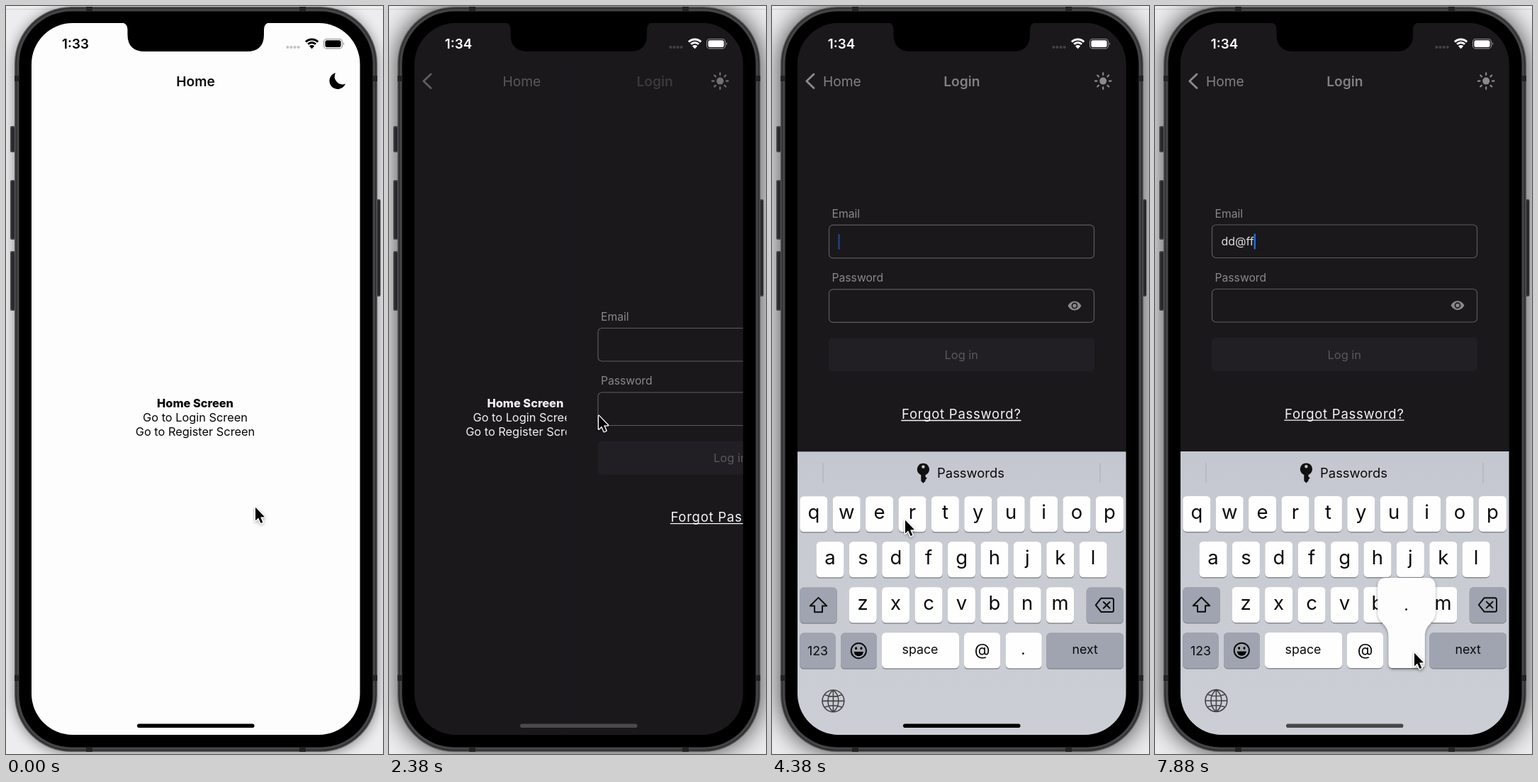
These frames come from a looping animation (532x1053 px, 8 s). An HTML page:

```html
<!DOCTYPE html>
<html lang="en">
<head>
<meta charset="utf-8">
<title>Login demo</title>
<style>
html, body { margin: 0; width: 100%; height: 100%; overflow: hidden; background: #ededef; }
svg { display: block; width: 100vw; height: 100vh; font-family: Inter, "Liberation Sans", sans-serif;
  --bg: #fefdfe; --ink: #060606; --title: #0b0b0c; --dots: #c3c2c5; --status: #000; --rim: #8f8e91; }
svg.dark { --bg: #1a181b; --ink: #f1f0f2; --title: #818083; --dots: #424145; --status: #fff; --rim: #8f8e91; }
.bg { fill: var(--bg); }
.ink { fill: var(--ink); }
.title { fill: var(--title); font-weight: 600; font-size: 19.2px; }
.mid { text-anchor: middle; }
.body { font-size: 16.35px; }
.label { font-size: 15.7px; fill: #89888b; }
.field { fill: none; stroke: #5b5a5d; stroke-width: 1.2; }
.letter { font-size: 27.5px; fill: #0a0a0b; text-anchor: middle; }
.small { font-size: 17.8px; fill: #0a0a0b; text-anchor: middle; }
.line { fill: none; stroke: #0c0c0d; stroke-width: 2; stroke-linejoin: round; stroke-linecap: round; }
</style>
</head>
<body>
<svg id="stage" viewBox="0 0 532 1053" preserveAspectRatio="none">
  <defs>
    <clipPath id="screen"><rect x="36" y="24" width="463.5" height="1002" rx="58"/></clipPath>
    <filter id="soft" x="-20%" y="-20%" width="140%" height="140%"><feGaussianBlur stdDeviation="9"/></filter>
    <filter id="deep" x="-20%" y="-20%" width="140%" height="140%"><feGaussianBlur stdDeviation="18"/></filter>
    <filter id="lift" x="-30%" y="-30%" width="160%" height="160%">
      <feDropShadow dx="0" dy="1.5" stdDeviation="2" flood-opacity=".35"/>
    </filter>
    <linearGradient id="board" x2="0" y2="1">
      <stop stop-color="#c4c7cf"/><stop offset=".3" stop-color="#c8cbd2"/><stop offset="1" stop-color="#cbced5"/>
    </linearGradient>
  </defs>

  <rect width="532" height="1053" fill="#ededef"/>
  <path d="M0 4.5H532" stroke="#cfcfd1"/>
  <rect id="calm" x="12" y="3" width="512" height="1049" rx="80" filter="url(#soft)"/>
  <rect id="active" x="12" y="1" width="512" height="1049" rx="80" filter="url(#deep)"/>

  <g id="phone"></g>

  <g clip-path="url(#screen)">
    <rect class="bg" x="36" y="24" width="464" height="1002"/>
    <g id="home" class="mid body">
      <text class="ink" x="267" y="565" font-weight="800">Home Screen</text>
      <text class="ink" x="267" y="585">Go to Login Screen</text>
      <text class="ink" x="267" y="605">Go to Register Screen</text>
    </g>
    <g id="login">
      <rect class="bg" x="36" y="24" width="464" height="1002"/>
      <g id="form">
        <text class="label" x="84.5" y="443">Email</text>
        <rect class="field" x="80.5" y="453.5" width="374" height="46.5" rx="5.5"/>
        <text id="email" x="93.5" y="482.5" font-size="16" fill="#dcdbde"></text>
        <rect id="caret" y="466" width="2.4" height="22" rx="1" fill="#1f6fe8"/>
        <text class="label" x="84.5" y="533">Password</text>
        <rect class="field" x="80.5" y="544" width="374" height="46.5" rx="5.5"/>
        <path fill="#89888b" fill-rule="evenodd" d="M417.5 567Q421 560.5 427 560.5T436.5 567Q433 573.5 427 573.5T417.5 567ZM422.6 567a4.4 4.4 0 1 0 8.8 0a4.4 4.4 0 1 0-8.8 0Z"/>
        <circle cx="427" cy="567" r="2.7" fill="#89888b"/>
        <rect x="80" y="612.5" width="375" height="47" rx="5" fill="#211f23"/>
        <text class="mid" x="267.3" y="642" font-size="16.4" fill="#59585b">Log in</text>
        <text class="mid" x="267.3" y="726" font-size="18.5" letter-spacing=".75" fill="#f6f5f7">Forgot Password?</text>
        <path d="M182.3 728.6H351.5" stroke="#f6f5f7" stroke-width="1.4"/>
      </g>
    </g>

    <text id="homeTitle" class="title mid" y="113">Home</text>
    <g id="back">
      <path d="M59 96L48.8 105.7L59 115.6" fill="none" stroke="#8b8a8d" stroke-width="2.8" stroke-linecap="round" stroke-linejoin="round"/>
      <text id="backLabel" y="113" font-size="19.2" fill="#818083">Home</text>
    </g>
    <text id="loginTitle" class="title mid" y="113">Login</text>
    <path id="moon" d="M465 94A11.7 11.7 0 1 0 479 109.5A11.2 11.2 0 0 1 465 94Z"/>
    <g id="sun" fill="#8b8a8d" stroke="#8b8a8d"></g>

    <text class="mid" x="98" y="60" font-size="18.8" font-weight="600" fill="var(--status)" id="clock"></text>
    <g id="status"></g>

    <g id="keyboard"></g>
    <rect id="bar" x="185" y="1010.5" width="165.5" height="5.6" rx="2.8"/>
  </g>

  <path d="M162 23Q171.5 24 171.5 33V40Q171.5 64 196 64H340Q364 64 364 40V33Q364 24 373 23Z"/>
  <g id="cursor">
    <path d="M1 1.8V20.6L5.2 16.6L8.5 24.1L11.4 22.9L8.1 15.5L14 15.2Z"
      stroke="#fff" stroke-width="2.6" stroke-linejoin="round" paint-order="stroke" filter="url(#lift)"/>
  </g>
</svg>
<script>
const $ = id => document.getElementById(id);
const clamp = v => Math.max(0, Math.min(1, v));
const smooth = v => v * v * (3 - 2 * v);
const box = (x, y, w, h, r, fill) =>
  `<rect x="${x}" y="${y}" width="${w}" height="${h}" rx="${r}" fill="${fill}"/>`;

// Phone body: side buttons, antenna bands and nested rims
const button = (x, y, h) => box(x, y, 7, h, 2, '#4c4c4e') + box(x + 1.5, y + 1.5, 5, h - 3, 1, '#29292b');
const rim = (d, fill) => box(12 + d, 1 + d, 512 - 2 * d, 1049 - 2 * d, 80 - d, fill);
$('phone').innerHTML =
  button(6, 169, 37) + button(6, 245, 84) + button(6, 345, 84) + button(521.5, 272, 137) +
  rim(0, '#59595b') + rim(1.5, '#29292b') + rim(3, '#444446') +
  [98, 942].map(y => box(12, y, 6, 8, 0, '#232325') + box(518, y, 6, 8, 0, '#232325')).join('') +
  [113, 414].map(x => box(x, 1, 9, 6, 0, '#232325') + box(x, 1044, 9, 6, 0, '#232325')).join('') +
  rim(6.5, '#000');

// Status icons
const arc = (r, w) => {
  const s = r * Math.SQRT1_2;
  return `<path d="M${431.6 - s} ${59.2 - s}A${r} ${r} 0 0 1 ${431.6 + s} ${59.2 - s}" fill="none" stroke="var(--status)" stroke-width="${w}"/>`;
};
$('status').innerHTML =
  [0, 1, 2, 3].map(i => `<circle cx="${397.4 + i * 5.1}" cy="58" r="2.1" fill="var(--dots)"/>`).join('') +
  arc(12.2, 2.9) + arc(7.7, 2.8) +
  '<path d="M431.6 60.2L428 56.4A5.2 5.2 0 0 1 435.2 56.4Z" fill="var(--status)"/>' +
  '<rect x="448.5" y="46.5" width="26" height="13.4" rx="4" fill="none" stroke="var(--rim)" stroke-width="1.1"/>' +
  box(450.4, 48.3, 22.2, 9.8, 2.5, 'var(--status)') +
  '<path d="M476 50.8Q478.3 53.2 476 55.6Z" fill="var(--rim)"/>';

$('sun').innerHTML = '<circle cx="467.2" cy="105.6" r="5" stroke="none"/>' +
  [...Array(8).keys()].map(i =>
    `<path d="M475.9 105.6h2.6" stroke-width="2.1" stroke-linecap="round" transform="rotate(${i * 45} 467.2 105.6)"/>`).join('');

// Keyboard
const keys = {};
const key = (x, y, w, fill = '#fefeff') =>
  box(x, y + 1.4, w, 50, 5.5, '#878a91') + box(x, y, w, 50, 5.5, fill);
const grey = '#9fa4b0';
const row = (chars, x0, y) => [...chars].map((c, i) => {
  const x = x0 + i * 46.4;
  keys[c] = { x, y, w: 39, size: 38 };
  return key(x, y, 39) + `<text class="letter" x="${x + 19.5}" y="${y + 31.5}">${c}</text>`;
}).join('');
keys['@'] = { x: 271, y: 882, w: 51, size: 32 };
keys['.'] = { x: 329.7, y: 882, w: 51, size: 23 };
const small = (x, y, s, size = 17.8) => `<text class="small" x="${x}" y="${y}" style="font-size:${size}px">${s}</text>`;

$('keyboard').innerHTML =
  '<rect x="36" y="627" width="464" height="399" fill="url(#board)"/>' +
  '<path d="M72 643V671.5M463 643V671.5" stroke="#b0b3bb" stroke-width="1.2"/>' +
  '<path fill="#111" fill-rule="evenodd" d="M210.3 660A8.6 8.6 0 1 1 216.5 660V662.5L218.8 664.5L216.5 666.8V668.5L213.4 671.5L210.3 668.5ZM211.2 648.3a2.2 2.2 0 1 0 4.4 0a2.2 2.2 0 1 0-4.4 0Z"/>' +
  small(280.5, 664, 'Passwords', 18.4) +
  row('qwertyuiop', 39.3, 690) + row('asdfghjkl', 62.5, 754) + row('zxcvbnm', 108.7, 818) +
  key(39.3, 818, 52.5, grey) + key(443.7, 818, 52.3, grey) +
  key(39.3, 882, 50.3, grey) + key(97, 882, 51, grey) +
  key(155, 882, 109) + key(271, 882, 51) + key(329.7, 882, 51) + key(387.3, 882, 108.7, grey) +
  '<path class="line" d="M65.5 832.5L53.8 844.2H60V852.8H71V844.2H77.2Z"/>' +
  '<path class="line" d="M464.5 833.3H479.5Q482 833.3 482 835.8V850.2Q482 852.7 479.5 852.7H464.5L456.8 843ZM467.8 838.6L476.6 847.4M476.6 838.6L467.8 847.4"/>' +
  small(64.5, 913.5, '123') + small(209, 912, 'space') + small(441.7, 912, 'next') +
  small(296.5, 913.5, '@', 22.5) + small(354.5, 912.5, '.', 22) +
  '<circle class="line" cx="122.3" cy="907.3" r="10.6"/>' +
  '<ellipse cx="118.6" cy="904" rx="1.5" ry="2"/><ellipse cx="126" cy="904" rx="1.5" ry="2"/>' +
  '<path d="M115.6 908.6H129Q128 914.8 122.3 914.8T115.6 908.6Z"/>' +
  '<path class="line" style="stroke:#434447;stroke-width:1.6" d="M71 978a15.4 15.4 0 1 0 30.8 0a15.4 15.4 0 1 0-30.8 0H101.8M86.4 962.6V993.4M86.4 962.6C76.5 970 76.5 986 86.4 993.4C96.3 986 96.3 970 86.4 962.6M74.5 969.3Q86.4 973.8 98.3 969.3M74.5 986.7Q86.4 982.2 98.3 986.7"/>' +
  '<g id="popup"></g>';

function callout(c) {
  const { x, y, w, size } = keys[c];
  const l = x - 15.5, r = x + w + 15, top = y - 77, end = x + w;
  return `<path fill="#fdfdfe" filter="url(#lift)" d="M${l} ${top + 12}Q${l} ${top} ${l + 12} ${top}H${r - 12}Q${r} ${top} ${r} ${top + 12}V${y - 29}
    C${r} ${y - 12} ${end} ${y - 14} ${end} ${y + 6}V${y + 44}Q${end} ${y + 50} ${end - 6} ${y + 50}H${x + 6}Q${x} ${y + 50} ${x} ${y + 44}V${y + 6}
    C${x} ${y - 14} ${l} ${y - 12} ${l} ${y - 29}Z"/>
    <text class="letter" x="${x + w / 2 - .7}" y="${y - (c === '.' ? 31 : 27)}" style="font-size:${size}px">${c}</text>`;
}

// Timeline, in seconds: pointer stops [time, x, y] and key presses [time, key]
const stops = [
  [0, 351, 704], [1, 470, 118], [1.125, 472, 113], [1.25, 472, 113], [1.75, 274, 592], [2, 295, 575],
  [2.375, 295, 575], [3.125, 206, 472], [3.375, 191, 484], [3.75, 191, 484], [4.375, 187, 722],
  [4.75, 178, 785], [5.25, 178, 785], [5.625, 292, 938], [6, 299, 907], [6.25, 299, 907],
  [6.375, 288, 847], [6.625, 222, 785], [7, 222, 785], [7.5, 355, 934], [7.875, 365, 909], [8, 365, 909]
];
const presses = [[4.75, 'd'], [5.125, 'd'], [6, '@'], [6.625, 'f'], [6.875, 'f'], [7.875, '.']];
const FOCUS = .5, DARK = 1.25, PUSH = 2.2765, EDIT = 3.75, RISE = 3.86, LIFT = 3.94, LAG = .125;

// Critically damped spring: what remains of the way after s seconds
const spring = s => s <= 0 ? 1 : (1 + 18.26 * s) * Math.exp(-18.26 * s);
const move = (id, x, y) => $(id).setAttribute('transform', `translate(${x} ${y})`);
const fade = (id, v) => $(id).setAttribute('opacity', v);

function pointer(t) {
  const i = Math.max(1, stops.findIndex(s => s[0] > t));
  const [a, ax, ay] = stops[i - 1], [b, bx, by] = stops[i];
  const k = smooth(clamp((t - a) / (b - a)));
  return [ax + (bx - ax) * k, ay + (by - ay) * k];
}

function draw(t) {
  const dark = t >= DARK;
  $('stage').setAttribute('class', dark ? 'dark' : '');
  fade('calm', t < FOCUS ? .45 : 0);
  fade('active', t < FOCUS ? 0 : .75);
  $('clock').textContent = t < FOCUS ? '1:33' : '1:34';

  // Screen change
  const left = spring(t - PUSH), p = 1 - left;
  move('home', -139 * p, 0);
  move('login', 463 * left, 0);
  fade('login', t > PUSH ? 1 : 0);
  $('homeTitle').setAttribute('x', 267.5 - 175 * p);
  fade('homeTitle', clamp(1 - 2 * p));
  fade('back', clamp((p - .05) / .8));
  $('backLabel').setAttribute('x', 72 + 191 * left);
  $('loginTitle').setAttribute('x', 267.8 + 231.5 * left);
  fade('loginTitle', p < .4 ? p / 4 : .1 + 1.5 * (p - .4));
  fade('moon', dark ? 0 : 1);
  fade('sun', dark ? 1 - .9 * p * left : 0);

  // Keyboard and form
  move('keyboard', 0, 400 * spring(t - RISE));
  move('form', 0, -145.5 * (1 - spring(t - LIFT)));
  const shade = t < 4 ? (dark ? 74 : 0) : 72 * clamp((t - 4.6) / .6);
  $('bar').setAttribute('fill', `rgb(${shade},${shade},${shade + (shade ? 3 : 0)})`);

  // Typing
  const typed = presses.filter(k => t >= k[0] + LAG);
  $('email').textContent = typed.map(k => k[1]).join('');
  const since = t - (typed.length ? typed[typed.length - 1][0] + LAG : EDIT);
  $('caret').setAttribute('x', 93.3 + (typed.length ? $('email').getComputedTextLength() : 0));
  fade('caret', since < 0 ? 0 : clamp(.6 + .9 * Math.cos(since / .85 * 2 * Math.PI)));
  const held = presses.find(k => t >= k[0] && t < k[0] + .2);
  $('popup').innerHTML = held ? callout(held[1]) : '';

  move('cursor', ...pointer(t));
}

const start = performance.now();
let shown = -1;
function tick() {
  const step = Math.floor((performance.now() - start) % 8000 / 125);
  if (step !== shown) draw((shown = step) / 8);
  requestAnimationFrame(tick);
}
tick();
</script>
</body>
</html>
```
